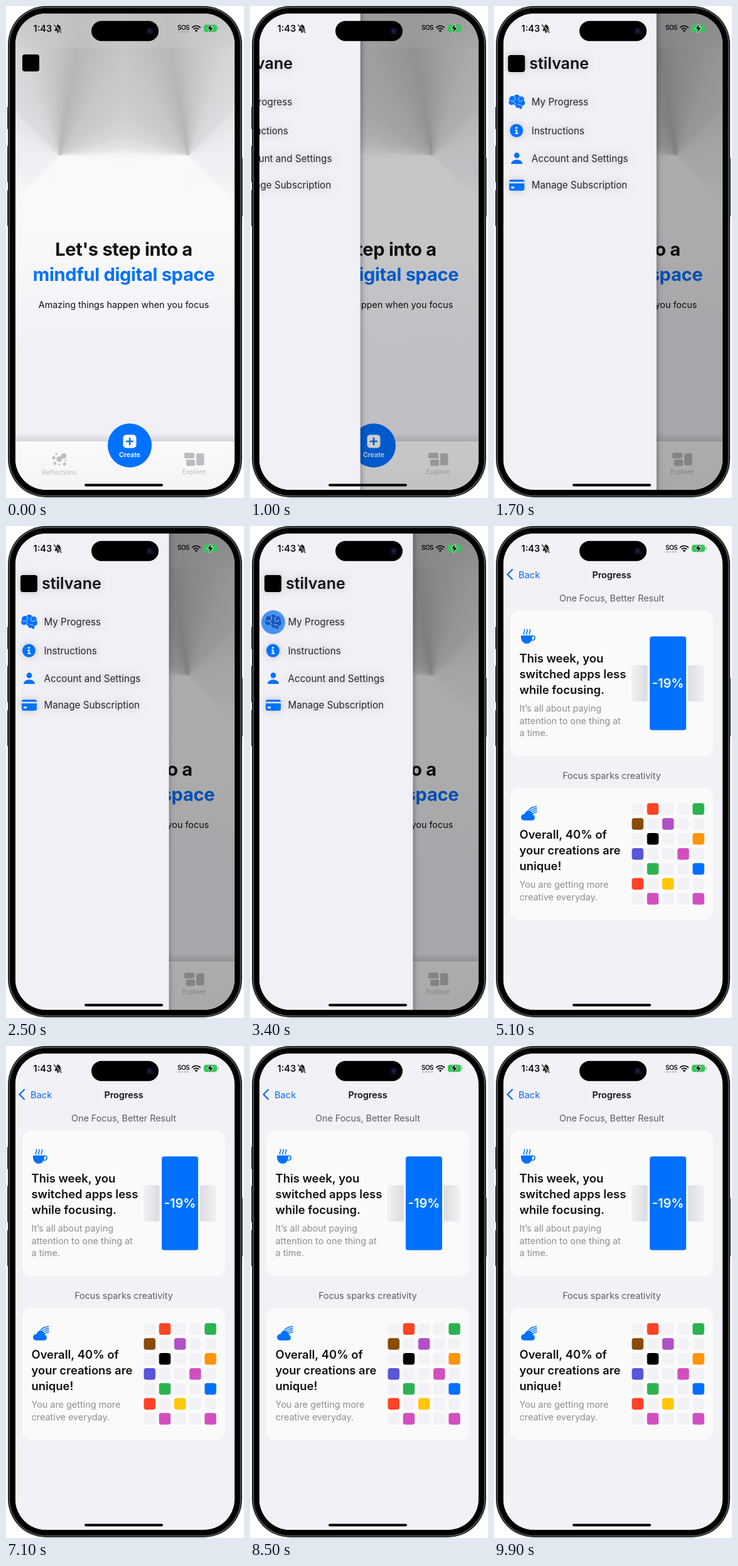
Animation of 379 by 782 pixels, one loop 10 s. Source, as an HTML page with a canvas:

```html
<!DOCTYPE html>
<html lang="en">
<head>
<meta charset="utf-8">
<title>Mindful space</title>
<style>
html, body { margin: 0; width: 100%; height: 100%; overflow: hidden; background: #fff; }
canvas { display: block; width: 379px; height: 782px; }
</style>
</head>
<body>
<canvas id="stage"></canvas>
<script>
const W = 379, H = 782, LOOP = 10000, STEP = 100;
const SCREEN = { x: 15, y: 12, w: 349, h: 757 };
const PAGE_LEFT = 11; // pages reach a little under the bezel
const MENU_W = 244.5;
const BLUE = '#0071ff', INK = '#111113', PAGE = '#f1f0f6';

const canvas = document.getElementById('stage');
const dpr = window.devicePixelRatio || 1;
canvas.width = W * dpr;
canvas.height = H * dpr;
const c = canvas.getContext('2d');

function box(x, y, w, h, r, fill) {
  c.beginPath();
  c.roundRect(x, y, w, h, r);
  c.fillStyle = fill;
  c.fill();
}
function disc(x, y, r, fill) {
  c.beginPath();
  c.arc(x, y, r, 0, 7);
  c.fillStyle = fill;
  c.fill();
}
function line(color, width, draw) {
  c.beginPath();
  draw();
  c.strokeStyle = color;
  c.lineWidth = width;
  c.lineCap = c.lineJoin = 'round';
  c.stroke();
}
function shape(color, d) {
  c.fillStyle = color;
  c.fill(new Path2D(d));
}
function text(s, x, y, size, weight = 400, color = INK, align = 'left') {
  c.font = `${weight} ${size}px Inter, "Liberation Sans", sans-serif`;
  c.textAlign = align;
  c.fillStyle = color;
  c.fillText(s, x, y);
}
function ramp(x0, y0, x1, y1, ...stops) {
  const g = c.createLinearGradient(x0, y0, x1, y1);
  stops.forEach(([at, color]) => g.addColorStop(at, color));
  return g;
}
function at(x, y, draw) {
  c.save();
  c.translate(x, y);
  draw();
  c.restore();
}
function shadowed(color, blur, draw) {
  c.save();
  c.shadowColor = color;
  c.shadowBlur = blur * dpr;
  draw();
  c.restore();
}

// Critically damped spring, 0 to 1
function spring(ms, rate) {
  const x = Math.max(0, ms) / 1000 * rate;
  return 1 - (1 + x) * Math.exp(-x);
}

function rays() {
  const g = c.createConicGradient(0, 85, 238);
  [[0, '#f5f5f5'], [.02, '#f9f9fa'], [.37, '#f8f8f9'], [.385, '#f1f0f4'], [.5, '#efeef2'],
   [.57, '#ebeaee'], [.62, '#e4e3e6'], [.63, '#dddce0'], [.69, '#d6d5d8'], [.74, '#c6c5c7'],
   [.775, '#b7b6b8'], [.8, '#bdbdbe'], [.84, '#c7c7c8'], [.9, '#cdcdce'], [.95, '#d8d8d9'],
   [.98, '#e5e5e6'], [1, '#f5f5f5']]
    .forEach(([p, color]) => g.addColorStop(p, color));
  c.fillStyle = g;
  c.fillRect(PAGE_LEFT, 12, 178.5, 340);
}

function homeScreen() {
  c.fillStyle = PAGE;
  c.fillRect(SCREEN.x, SCREEN.y, SCREEN.w, SCREEN.h);
  rays();
  c.save();
  c.translate(W - 3.5, 0);
  c.scale(-1, 1);
  rays();
  c.restore();
  c.fillStyle = ramp(0, 12, 0, 66, [0, 'rgba(194,194,195,.75)'], [1, 'rgba(204,204,205,.35)']);
  c.fillRect(15, 12, 349, 54);
  c.fillStyle = ramp(0, 260, 0, 540, [0, 'rgba(249,249,250,0)'], [.28, '#f9f9fa'], [.52, '#f7f7f9'], [1, PAGE]);
  c.fillRect(15, 260, 349, 280);

  box(26, 77, 27, 27, 4, '#000');
  c.letterSpacing = '-0.3px';
  text("Let's step into a", 187.5, 397, 29, 700, INK, 'center');
  text('mindful digital space', 187.5, 437, 29, 700, BLUE, 'center');
  c.letterSpacing = '0px';
  text('Amazing things happen when you focus', 187.5, 480, 14.35, 400, INK, 'center');

  c.fillStyle = ramp(0, 680, 0, 692, [0, 'rgba(0,0,0,.01)'], [1, 'rgba(0,0,0,.12)']);
  c.fillRect(15, 680, 349, 12);
  c.fillStyle = ramp(0, 692, 0, 769, [0, '#fafafa'], [1, '#f4f4f7']);
  c.fillRect(15, 692, 349, 77);

  const gray = '#bdbdc1';
  disc(85, 720, 4.6, gray);
  disc(92, 715, 4.2, gray);
  [[76, 718, 2.6], [80, 712, 1.8], [78, 727, 2.4], [85, 729, 1.4], [95, 722, 1.5]]
    .forEach(p => disc(...p, gray));
  shape(gray, 'M93 724l1.2 2.8 2.8 1.2-2.8 1.2-1.2 2.8-1.2-2.8-2.8-1.2 2.8-1.2z');
  text('Reflections', 85, 745, 10.6, 400, gray, 'center');
  box(284, 710, 16, 9, 2, gray);
  box(287, 721, 14, 10, 2, gray);
  box(303, 711, 12.5, 19, 2, gray);
  text('Explore', 299.5, 744, 10.6, 400, gray, 'center');

  disc(197, 698.5, 35, BLUE);
  box(186.5, 681.5, 21, 21, 5, '#fff');
  line(BLUE, 2.6, () => {
    c.moveTo(192, 692); c.lineTo(202, 692);
    c.moveTo(197, 687); c.lineTo(197, 697);
  });
  text('Create', 197, 716.5, 10.6, 600, '#fff', 'center');
}

function brain(color) {
  [[30, 148, 5], [37, 145.5, 4.8], [44, 148.5, 4.8], [28.5, 153, 4.4], [36, 152.5, 5.5], [45.5, 154, 4.6], [39, 158, 4]]
    .forEach(p => disc(...p, color));
  shape(color, 'M39 157l7-1-1 7.5h-3z');
  line(PAGE, .8, () => {
    c.moveTo(33, 143); c.quadraticCurveTo(37, 147, 32, 151);
    c.moveTo(27, 151); c.quadraticCurveTo(34, 150, 34, 156);
    c.moveTo(41, 145); c.quadraticCurveTo(37, 150, 42, 152);
    c.quadraticCurveTo(46, 152, 46, 149);
    c.moveTo(38, 156); c.lineTo(44, 158);
  });
}

function menu(pressed) {
  shadowed('rgba(0,0,0,.45)', 9, () => {
    c.fillStyle = PAGE;
    c.fillRect(PAGE_LEFT, 0, MENU_W + SCREEN.x - PAGE_LEFT, H);
  });

  shadowed('rgba(0,0,0,.2)', 12, () => {
    box(23, 78, 27, 27, 4, '#000');
    text('stilvane', 57, 100, 25, 600);
    [['My Progress', 157.5], ['Instructions', 203.5], ['Account and Settings', 247.5], ['Manage Subscription', 290]]
      .forEach(([label, y]) => text(label, 60.5, y, 15.2, 400, '#27272a'));
    disc(36.5, 198, 10.5, BLUE);
    box(25, 276, 24, 17.5, 3, BLUE);
  });

  if (pressed) disc(37, 153, 19, '#4893ee');
  brain(pressed ? '#1558c4' : BLUE);
  disc(36.5, 193.5, 1.6, '#fff');
  line('#fff', 1.8, () => {
    c.moveTo(35, 197.5); c.lineTo(36.8, 197.5); c.lineTo(36.8, 202.5);
    c.moveTo(34.8, 202.7); c.lineTo(38.8, 202.7);
  });
  disc(37, 237.5, 4.4, BLUE);
  shape(BLUE, 'M28 251c0-9 18-9 18 0z');
  c.fillStyle = PAGE;
  c.fillRect(25, 279.5, 24, 2.3);
  box(28, 287, 5, 3, .8, PAGE);
}

function lines(rows, y, gap, ...style) {
  rows.forEach((row, i) => text(row, 40.5, y + i * gap, ...style));
}

function cup() {
  shape(BLUE, 'M43 174h18v2c0 6-3 11-9 11s-9-5-9-11z');
  line(BLUE, 1.7, () => c.arc(61.5, 178, 3.6, -1.5, 1.7));
  line(BLUE, 1.4, () => {
    for (const x of [48, 52.5, 57]) {
      c.moveTo(x, 172);
      c.bezierCurveTo(x - 3, 169, x + 3, 168, x, 164.5);
    }
  });
}

function cloud() {
  disc(48, 463, 5, BLUE);
  disc(55, 459, 6.5, BLUE);
  disc(60.5, 463.5, 4.5, BLUE);
  c.fillStyle = BLUE;
  c.fillRect(48, 461, 12.5, 7);
  for (let r = 9; r < 20; r += 3) {
    line(BLUE, 1.3, () => c.arc(68, 464, r, Math.PI * (r > 12 ? 1.17 : 1.1), Math.PI * 1.5));
  }
}

const SWATCH = {
  r: '#ff4425', g: '#2cb251', n: '#8a4a08', v: '#b14fc9', k: '#000', o: '#ff9408',
  i: '#5856d9', p: '#d24fc0', b: BLUE, y: '#ffc708', '.': '#f2f1f6'
};
const MOSAIC = ['.r..g', 'n.v..', '.k..o', 'i..p.', '.g..b', 'r.y..', '.p..p'];

function progressScreen() {
  shadowed('rgba(0,0,0,.18)', 14, () => {
    c.fillStyle = '#f2f1f7';
    c.fillRect(PAGE_LEFT, 0, W, H);
  });

  line('#0a6cec', 2.2, () => { c.moveTo(29, 69.5); c.lineTo(21.5, 77); c.lineTo(29, 84.5); });
  text('Back', 39, 82.5, 14.7, 400, '#0a6cec');
  text('Progress', 187.5, 82.5, 14.4, 600, INK, 'center');
  text('One Focus, Better Result', 187.5, 120, 14.3, 400, '#5c5c61', 'center');
  text('Focus sparks creativity', 187.5, 402, 14.3, 400, '#5c5c61', 'center');
  box(26, 133.5, 323, 233, 16, '#fafafa');
  box(26, 415.5, 323, 212, 16, '#fafafa');

  cup();
  lines(['This week, you', 'switched apps less', 'while focusing.'], 216.5, 25, 18.4, 600);
  lines(['It’s all about paying', 'attention to one thing at', 'a time.'], 295, 19.7, 14.4, 400, '#8e8e93');
  box(219, 221, 25.5, 58, 4, ramp(219, 0, 244, 0, [0, '#f2f2f5'], [1, '#dcdce0']));
  box(309, 221, 25.5, 58, 4, ramp(309, 0, 334, 0, [0, '#dcdce0'], [1, '#f2f2f5']));
  box(248, 175.5, 58, 149, 4, BLUE);
  text('-19%', 277, 257, 20, 600, '#fff', 'center');

  cloud();
  lines(['Overall, 40% of', 'your creations are', 'unique!'], 497, 25, 18.4, 600);
  lines(['You are getting more', 'creative everyday.'], 575, 19.7, 14.4, 400, '#8e8e93');
  MOSAIC.forEach((row, j) => [...row].forEach((key, i) =>
    box(219.5 + i * 24.2, 440.5 + j * 23.8, 18.5, 18.5, 4, SWATCH[key])));
}

function statusBar() {
  text('1:43', 43.5, 41, 14.6, 600);
  shape(INK, 'M77 39.5c2-2 1.5-4 2-6 .6-2 2-3 3-3 0-1.6 1.6-1.6 1.6 0 1.2 0 2.6 1 3 3 .5 2 0 4 2 6z');
  disc(82.8, 41, 1.6, INK);
  line('#d8d8da', 2.6, () => { c.moveTo(77, 30); c.lineTo(88, 42); });
  line(INK, 1.1, () => { c.moveTo(76.5, 30); c.lineTo(88, 42.3); });
  c.letterSpacing = '-0.6px';
  text('SOS', 282.5, 38.3, 10, 600, INK, 'center');
  c.letterSpacing = '0px';
  for (let i = 0; i < 4; i++) box(274.5 + i * 4.6, 40.5, 2.6, 1.6, .6, '#909094');
  for (const r of [4.8, 8.6]) {
    line(INK, 1.9, () => c.arc(303, 40, r, Math.PI * 1.24, Math.PI * 1.76));
  }
  disc(303, 39.2, 1.7, INK);

  const bolt = 'M326.5 29l-5.5 7.3h3.8l-1 5.7 6-7.6h-4z';
  box(315, 29.8, 21, 11.4, 3.6, '#34c759');
  box(337, 33.8, 1.4, 3.6, .7, '#7f9c85');
  c.strokeStyle = '#d9efdf';
  c.lineWidth = 1.6;
  c.stroke(new Path2D(bolt));
  shape(INK, bolt);

  box(136, 23.7, 107, 32, 16, '#000');
  disc(229, 40, 6, '#0b0c1c');
  disc(229, 40, 3.4, '#15183c');
  disc(228, 39, 1.2, '#2a3070');
  box(125, 759.5, 125, 4, 2, '#000');
}

function phone() {
  [[2, 160, 36], [2, 222, 58], [2, 292, 58], [372, 241, 94]]
    .forEach(([x, y, h]) => box(x, y, 4.8, h, 1.5, '#2b2e2e'));
  box(3, 0, 373, 781, 61, '#242727');
  line('#555959', 1.2, () => c.roundRect(5.4, 2.4, 368.2, 776.2, 58.5));
  box(6.5, 3.5, 366, 774, 57, '#000');
}

function draw(t) {
  c.setTransform(dpr, 0, 0, dpr, 0, 0);
  c.fillStyle = '#fff';
  c.fillRect(0, 0, W, H);
  phone();

  const open = spring(t - 729, 8.3);
  const push = spring(t - 3520, 11.6);
  c.save();
  c.beginPath();
  c.roundRect(SCREEN.x, SCREEN.y, SCREEN.w, SCREEN.h, 49);
  c.clip();

  at(-.3 * SCREEN.w * push, 0, () => {
    homeScreen();
    if (t >= 600 && t < 800) {
      disc(39.5, 90.5, 19, 'rgba(40,130,245,.6)');
      box(26, 77, 27, 27, 4, '#000');
    }
    if (open > 0) {
      c.fillStyle = `rgba(0,0,0,${.31 * open})`;
      c.fillRect(15, 0, 349 * 1.4, H);
      at(-MENU_W * (1 - open), 0, () => menu(t >= 3300 && t < 3600));
    }
  });
  if (push > 0) {
    c.fillStyle = `rgba(0,0,0,${.1 * push})`;
    c.fillRect(15, 0, 349, H);
    at(SCREEN.w * (1 - push), 0, progressScreen);
  }
  statusBar();
  c.restore();
}

function tick() {
  const t = performance.now() % LOOP;
  draw(Math.floor(t / STEP) * STEP);
  requestAnimationFrame(tick);
}
tick();
</script>
</body>
</html>
```
